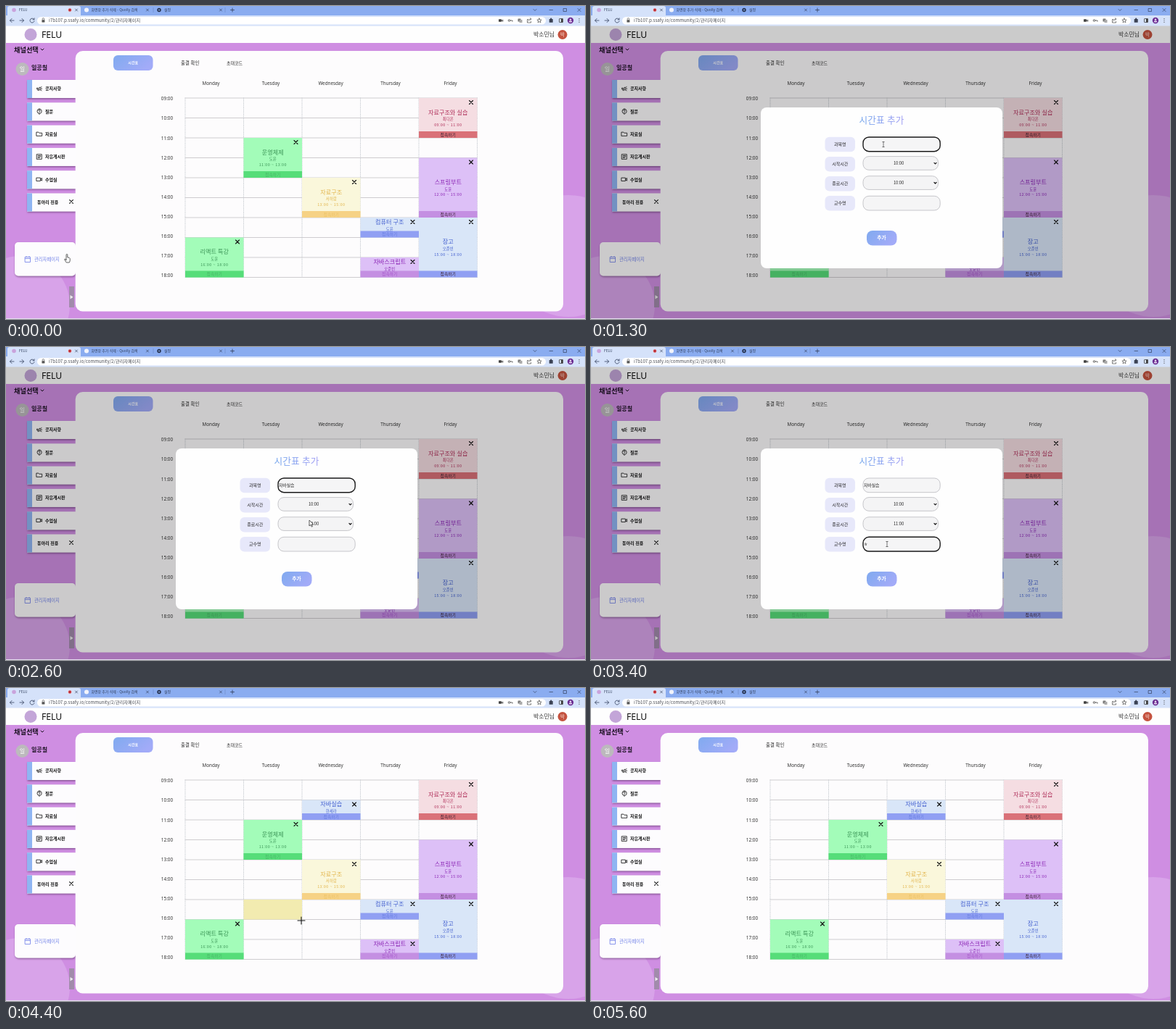
These frames come from a looping animation (798 px wide and 432 px high, 5.7 s). An HTML page:

```html
<!DOCTYPE html>
<html lang="ko">
<head>
<meta charset="utf-8">
<title>Timetable</title>
<style>
html, body { margin: 0; width: 100%; height: 100%; overflow: hidden; background: #cf8ee2; }
svg { display: block; width: 798px; height: 432px; font-family: "Noto Sans CJK KR", "Noto Sans CJK", "Noto Sans", sans-serif; }
.lat { font-family: "Noto Sans", "Open Sans", sans-serif; }
.line { fill: none; stroke-linecap: round; stroke-linejoin: round; }
</style>
</head>
<body>
<svg id="stage" viewBox="0 0 798 432" xmlns="http://www.w3.org/2000/svg"></svg>
<script>
const LOOP = 5700, STEP = 100;
const OPEN = 300, CLOSE = 4400;
const GRID = { x: 247, y: 127, w: 80.5, h: 27.5 };
const colX = c => GRID.x + c * GRID.w;
const rowY = hour => GRID.y + (hour - 9) * GRID.h;
const clock = hour => String(hour).padStart(2, '0') + ':00';

const rect = (x, y, w, h, fill, r = 0, more = '') =>
  `<rect x="${x}" y="${y}" width="${w}" height="${h}" rx="${r}" fill="${fill}" ${more}/>`;
const circle = (x, y, r, fill, more = '') => `<circle cx="${x}" cy="${y}" r="${r}" fill="${fill}" ${more}/>`;
const line = (d, color = '#333', w = 0.8, more = '') =>
  `<path class="line" d="${d}" stroke="${color}" stroke-width="${w}" ${more}/>`;
const text = (x, y, size, str, fill = '#222', more = '') =>
  `<text x="${x}" y="${y + size * 0.36}" font-size="${size}" fill="${fill}" ${more}>${str}</text>`;
const mid = 'text-anchor="middle"';
const bold = 'font-weight="700"';
const cross = (x, y, r, color = '#111', w = 1.1) =>
  line(`M${x - r} ${y - r}l${2 * r} ${2 * r}m0 ${-2 * r}l${-2 * r} ${2 * r}`, color, w);
const glyph = (x, y, d) => line(d, '#111', 2.2, `transform="translate(${x} ${y}) scale(.37)"`);

const defs = `<defs>
  <linearGradient id="blue" x2="1" y2="0.5"><stop stop-color="#80aaef"/><stop offset="1" stop-color="#a2abf8"/></linearGradient>
  <linearGradient id="title"><stop stop-color="#72a5ec"/><stop offset="1" stop-color="#a3a0f4"/></linearGradient>
  <filter id="shade" x="-20%" y="-20%" width="140%" height="150%"><feDropShadow dx="0.6" dy="1.4" stdDeviation="0.9" flood-color="#432050" flood-opacity="0.55"/></filter>
</defs>`;

function browser() {
  const ink = '#34415e';
  let s = rect(0, 0, 798, 13.5, '#8aacf0') + rect(0, 13, 798, 14.5, '#d5e2fa');
  s += rect(2, 0, 101, 16, '#d5e2fa', 3);
  s += circle(11, 5.5, 2.8, '#c9a3dc') + text(18, 5.5, 4.8, 'FELU', ink);
  s += circle(88, 5.5, 2.2, '#e04747') + circle(88, 5.5, 1, '#8c2333');
  s += circle(111, 5.5, 3, '#f2f4fb') + text(117.5, 5.5, 4.9, '화면창 추가 삭제 - Quolly 검색', ink);
  s += circle(211, 5.5, 2.7, '#26334f') + circle(211, 5.5, 1, '#8aacf0') + text(218, 5.5, 5, '설정', ink);
  s += [97, 195, 296].map(x => cross(x, 5.5, 1.5, ink, 0.7)).join('');
  s += line('M203 2.5v6M302 2.5v6', '#6480ba', 0.5) + line('M309.5 5.5h5M312 3v5', ink);
  s += line('M727 4.5l2 2 2-2M749 5.5h4.5M768.5 3.5h4v4h-4z', ink, 0.7) + cross(790, 5.5, 2, ink, 0.7);
  s += line('M11 20H5.5m2.5-2.6L5.5 20 8 22.6M19 20h5.5M22 17.4l2.5 2.6-2.5 2.6', ink);
  s += line('M38.6 18.4a3 3 0 1 0 .4 2.4M39 16.8v2h-2', ink);
  s += rect(43, 15, 701, 10.5, '#fff', 5.2);
  s += rect(49.4, 19.2, 4, 3.4, '#555', 0.5) + line('M50.2 19v-1.2a1.2 1.2 0 0 1 2.4 0V19', '#555', 0.7);
  s += text(59, 20, 6.2, 'i7b107.p.ssafy.io/community/2/관리자페이지', '#4a4d55');
  s += rect(679, 18.2, 4, 3.6, '#444', 0.4) + line('M683.4 20l1.4-1v2z', '#444');
  s += circle(693.5, 20, 1.3, 'none', 'stroke="#444" stroke-width=".8"') + line('M695 20h3v1.2', '#444');
  s += rect(705.5, 17.5, 4, 4, '#777', 0.5) + rect(707.5, 19, 4, 4, '#aaa', 0.5);
  s += line('M720 18.5h-1.5V23h5v-1.5M720.5 20.5c0-2 1-2.5 3-2.5m-1-1.3l1.4 1.3-1.4 1.3', '#444', 0.7);
  s += line('M735 17l.9 2 2.2.2-1.7 1.4.5 2.2-1.9-1.2-1.9 1.2.5-2.2-1.7-1.4 2.2-.2z', '#444', 0.7);
  s += rect(748.7, 18, 5, 4.8, '#3b4254', 0.6) + circle(751.2, 17.7, 1.1, '#3b4254');
  s += rect(762.5, 17.5, 5, 5, 'none', 0.5, 'stroke="#444" stroke-width=".8"') + rect(765, 17.5, 2.5, 5, '#444');
  s += circle(778, 20, 4.2, '#6a2c91') + circle(778, 18.8, 1.3, '#e5d4ef') + rect(775.9, 20.5, 4.2, 2, '#e5d4ef', 1);
  return s + [17.7, 20, 22.3].map(y => circle(790, y, 0.6, '#444')).join('');
}

const MENU = [
  ['공지사항', 'M3 10v4h3l1.5 5H9l-1-5h2l5 4V6l-5 4zM18 12h4M17.5 7l3-2M17.5 17l3 2'],
  ['질문', 'M12 2.5a9 9 0 0 1 2 17.7L12 23v-2.6A9 9 0 0 1 12 2.5M9 9.5a3 3 0 1 1 4 2.7q-1 .6-1 2.3M12 17v.2'],
  ['자료실', 'M2 5h7l2.5 3H22v11H2z'],
  ['자유게시판', 'M3 3h18v18H3zM7 8h10M7 12h10M7 16h6'],
  ['수업실', 'M2 6h14v12H2zM16.5 11l5-4v10l-5-4'],
  ['동아리 전용']
];

function sidebar() {
  let s = text(11, 61, 9.2, '채널선택', '#1a1020', bold) + line('M48 59l2 2 2-2', '#1a1020', 1);
  s += circle(22.5, 87, 9, '#bcb9bd') + text(22.5, 87, 8, '일', '#fff', mid) + text(35, 85, 8, '일공칠', '#1a1020', bold);
  MENU.forEach(([label, shape], i) => {
    const y = 102 + i * 31.3, cy = y + 12.2;
    s += rect(29, y, 67, 25, '#fdfcfe', 0, 'filter="url(#shade)"') + rect(29, y, 7, 25, '#8fb5f2');
    s += text(shape ? 54 : 43, cy, 6, label, '#111', bold);
    s += shape ? glyph(41.5, cy - 4.5, shape) : cross(90, cy - 0.7, 2.4);
  });
  s += rect(12, 326, 84, 46.5, '#fdfcfe', 5, 'filter="url(#shade)"');
  s += line('M26.5 346.5h7v7h-7zM26.5 348.5h7M28 345.5v1M32 345.5v1', '#7d8bea', 0.9);
  s += text(39, 349.5, 6.3, '관리자페이지', '#7182e8');
  return s + rect(87, 387, 7, 29, '#a18bab') + '<path d="M88.5 399l4 2.7-4 2.7z" fill="#eee"/>';
}

const TONES = {
  pink: ['#f5dde2', '#da7178', '#b0305a'],
  violet: ['#ddc0f7', '#c48fe2', '#8b25b5'],
  blue: ['#d9e6f8', '#909ff3', '#4460cf'],
  green: ['#a3fcb9', '#56dd79', '#3d9658'],
  yellow: ['#faf7db', '#f6d285', '#e2b54c']
};
const CARDS = [
  ['자료구조와 실습', '최다온', 4, 9, 11, 'pink'],
  ['스프링부트', '도윤', 4, 12, 15, 'violet'],
  ['장고', '오준빈', 4, 15, 18, 'blue'],
  ['운영체제', '도윤', 1, 11, 13, 'green'],
  ['자료구조', '서하람', 2, 13, 15, 'yellow'],
  ['컴퓨터 구조', '도윤', 3, 15, 16, 'blue'],
  ['자바스크립트', '오준빈', 3, 17, 18, 'violet'],
  ['리액트 특강', '도윤', 0, 16, 18, 'green']
];
const ADDED = ['자바실습', '한세라', 2, 10, 11, 'blue'];

function card([title, name, col, from, to, tone]) {
  const [bg, bar, ink] = TONES[tone];
  const x = colX(col), y = rowY(from), h = rowY(to) - y, cx = x + GRID.w / 2;
  const short = to - from === 1, c = y + (h - 9) / 2;
  let s = rect(x, y, GRID.w, h, bg) + rect(x, y + h - 9, GRID.w, 9, bar);
  s += text(cx, y + h - 4.4, 5.8, '접속하기', col === 4 ? '#3a2230' : ink, mid + (col === 4 ? '' : ' opacity=".55"'));
  s += text(cx, short ? y + 6 : c - 3.2, 8.1, title, ink, mid);
  s += text(cx, short ? y + 15.6 : c + 6.5, 5.4, name, ink, mid);
  if (!short) s += text(cx, c + 14.2, 5.4, `${clock(from)} ~ ${clock(to)}`, ink, mid + ' letter-spacing=".4"');
  return s + cross(x + 72, y + 6, 2.5);
}

function timetable() {
  let s = rect(95.7, 62, 672.3, 359.5, '#fdfcfd', 10);
  s += rect(148, 68, 54.5, 21, 'url(#blue)', 6) + text(175.2, 78.5, 5, '시간표', '#fff', mid + ' ' + bold);
  s += text(241, 78.5, 6.4, '출결 확인') + text(304, 78.5, 6, '초대코드');
  ['Monday', 'Tuesday', 'Wednesday', 'Thursday', 'Friday'].forEach((d, i) => {
    s += text(282.5 + i * 82.5, 106.5, 6.3, d, '#333', mid + ' class="lat"');
  });
  for (let h = 9; h <= 18; h++) {
    s += text(222, 128 + (h - 9) * 27.1, 6.4, clock(h), '#333', mid + ' class="lat"');
    s += line(`M${GRID.x} ${rowY(h)}H${colX(5)}`, '#c3c1c5', 0.8);
  }
  for (let c = 0; c <= 5; c++) {
    s += line(`M${colX(c)} ${GRID.y}V${rowY(18)}`, '#bfc3ca', 0.7, 'stroke-dasharray="1 1.5"');
  }
  return s + `<g id="hover">${rect(0, 0, GRID.w, GRID.h, '#f2ebb0')}</g>` +
    CARDS.map(card).join('') + `<g id="added">${card(ADDED)}</g>`;
}

function page() {
  return rect(0, 27, 798, 405, '#cf8ee2') +
    circle(20, 413, 68, '#d8a3e9') + circle(775, 345, 84, '#d8a3e9') +
    rect(0, 27, 798, 24, '#fefefe') +
    circle(34, 39.5, 8.5, '#c3a5d8') + text(49, 39.5, 12.2, 'FELU', '#111', 'class="lat" font-weight="500"') +
    text(727, 39.5, 7.9, '박소민님', '#333') + circle(767, 39.5, 6.5, '#c4523f') + text(767, 39.5, 6.5, '박', '#f6d9cf', mid) +
    sidebar() + timetable();
}

function modal() {
  let s = rect(0, 27, 798, 405, '#000', 0, 'opacity=".2"') + rect(234, 140, 333, 222, '#fefefe', 8);
  s += text(400.5, 157, 12.7, '시간표 추가', 'url(#title)', mid + ' font-weight="500"');
  const border = 'stroke="#b9b9be" stroke-width=".8"';
  ['과목명', '시작시간', '종료시간', '교수명'].forEach((label, i) => {
    const y = 190.8 + i * 27.1;
    s += rect(322.5, y - 10, 41.5, 20.5, '#e7e8fa', 6) + text(343.2, y + 0.2, 6, label, '#222', mid);
    if (i === 1 || i === 2) {
      s += rect(375, y - 10.3, 103.5, 18.7, '#f4f4f5', 8, border);
      s += text(424, y - 0.8, 5.7, '10:00', '#222', mid + ` id="time${i}"`);
      s += line(`M473 ${y - 1.5}l1.5 1.5 1.5-1.5`, '#111', 1.2);
    } else {
      s += rect(375, y - 9.8, 106.2, 19.7, '#f5f5f6', 8, border + ` id="box${i}"`);
      s += text(376, y + 0.2, 5.8, '', '#222', `id="field${i}"`);
    }
  });
  return s + rect(380, 310, 41.5, 20.5, 'url(#blue)', 8) +
    rect(380, 310, 41.5, 20.5, '#3c68c8', 8, 'id="press" opacity=".3"') +
    text(400.5, 320, 6.8, '추가', '#fff', mid + ' ' + bold);
}

const POINTERS = `
  <g id="arrow"><path d="M0 0v8l1.9-1.7 1.3 2.9 1.3-.6-1.3-2.8h2.5z" fill="#fff" stroke="#222" stroke-width=".7"/></g>
  <g id="hand"><path d="M-1 4V-3.5q0-1 .9-1t.9 1V0q2.9-.2 3.4 1.6V4q0 2-1 3H-.8L-3.4 3q0-1.3 1.2-.7z" fill="#fff" stroke="#222" stroke-width=".7"/></g>
  <g id="beam">${line('M-1.2-3.5h2.4M0-3.5v7M-1.2 3.5h2.4', '#444', 0.7)}</g>
  <g id="plus">${line('M-5 0H5M0-5V5', '#111', 1.1)}</g>`;

document.getElementById('stage').innerHTML = defs + page() +
  `<g id="modal">${modal()}</g>` + browser() + rect(0, 431, 798, 1, '#e6dff0') +
  `<g id="pointer">${POINTERS}</g>`;
const $ = id => document.getElementById(id);
const show = (id, on) => $(id).setAttribute('visibility', on ? 'visible' : 'hidden');

// time, x, y of the pointer's stops
const PATH = [
  [0, 84, 347], [200, 444, 173], [500, 444, 173], [900, 403, 191], [2200, 403, 191],
  [2600, 418, 239], [3000, 418, 239], [3300, 408, 272], [3900, 408, 272],
  [4200, 403, 320], [4300, 403, 320], [4400, 407, 321], [4700, 407, 321], [5200, 424, 446]
];
function pointerAt(t) {
  const i = PATH.findIndex(p => p[0] > t);
  if (i < 0) return PATH[PATH.length - 1].slice(1);
  const [t0, x0, y0] = PATH[i - 1], [t1, x1, y1] = PATH[i];
  const k = (t - t0) / (t1 - t0), e = k * k * (3 - 2 * k);
  return [x0 + (x1 - x0) * e, y0 + (y1 - y0) * e];
}

// Hangul is composed one keystroke at a time
const SUBJECT = ['', 'ㅈ', '자', '잡', '자바', '자밧', '자바시', '자바실', '자바싨', '자바실스', '자바실습'];
const TEACHER = ['', 'ㅎ', '하', '한', '한ㅅ', '한세', '한셀', '한세라'];
const typed = (keys, t, start, gap) =>
  keys[Math.max(0, Math.min(keys.length - 1, Math.floor((t - start) / gap) + 1))];

function freeCell(x, y, cards) {
  const c = Math.floor((x - GRID.x) / GRID.w), h = 9 + Math.floor((y - GRID.y) / GRID.h);
  if (c < 0 || c > 4 || h < 9 || h > 17) return null;
  return cards.some(([, , col, from, to]) => col === c && h >= from && h < to) ? null : [c, h];
}

function focus(id, on) {
  $(id).setAttribute('stroke', on ? '#1a1a1a' : '#b9b9be');
  $(id).setAttribute('stroke-width', on ? 1.4 : 0.8);
}

function draw(t) {
  const open = t >= OPEN && t < CLOSE, added = t >= CLOSE;
  const [x, y] = pointerAt(t);
  const cell = open ? null : freeCell(x - 3, y - 3, added ? [...CARDS, ADDED] : CARDS);
  show('modal', open);
  show('added', added);
  show('hover', cell);
  if (cell) $('hover').setAttribute('transform', `translate(${colX(cell[0])} ${rowY(cell[1])})`);

  $('field0').textContent = typed(SUBJECT, t, 1400, 80);
  $('field3').textContent = typed(TEACHER, t, 3400, 70);
  $('time2').textContent = t >= 2900 ? '11:00' : '10:00';
  focus('box0', t >= 1000 && t < 2700);
  focus('box3', t >= 3300 && t < 4300);
  const onButton = open && x > 380 && x < 421 && y > 310 && y < 330;
  show('press', onButton);

  const inField = open && x > 375 && x < 481 && (Math.abs(y - 191) < 10 || Math.abs(y - 272) < 10);
  const kind = cell ? 'plus' : inField ? 'beam' : onButton || t < 100 ? 'hand' : 'arrow';
  for (const k of ['arrow', 'hand', 'beam', 'plus']) $(k).setAttribute('display', k === kind ? 'inline' : 'none');
  $('pointer').setAttribute('transform', `translate(${x} ${y})`);
}

const begin = performance.now();
function tick() {
  const t = (performance.now() - begin) % LOOP;
  draw(Math.floor(t / STEP) * STEP);
  requestAnimationFrame(tick);
}
tick();
</script>
</body>
</html>
```
